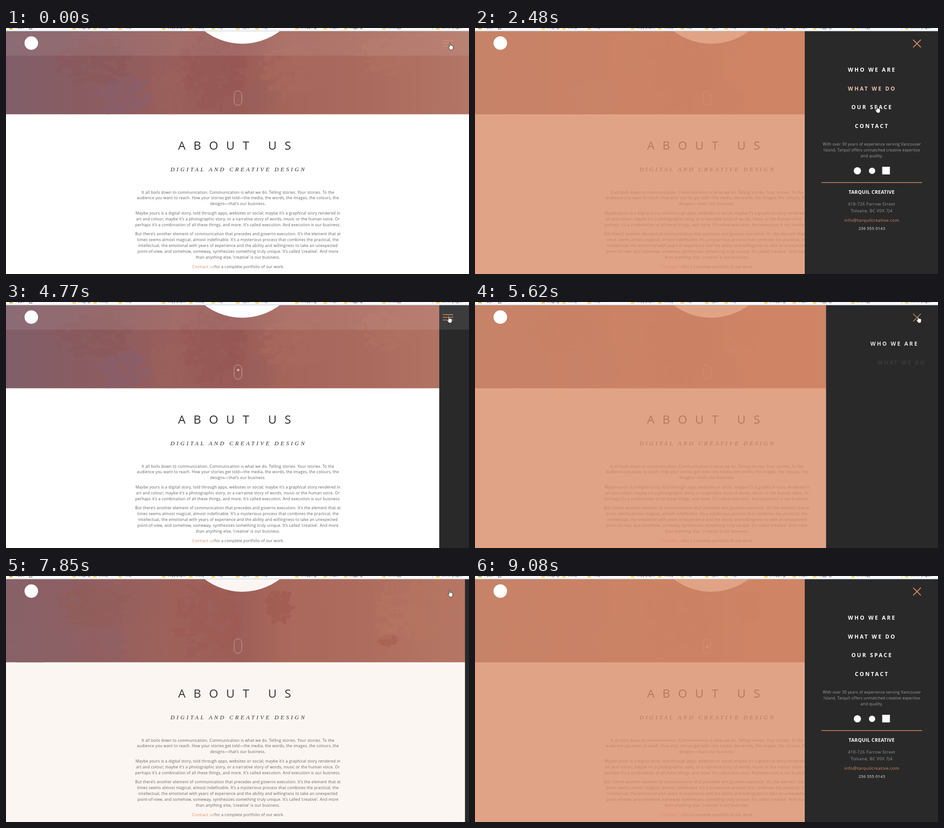
These frames come from a looping animation (1025 px wide and 546 px high, 9960 ms). An HTML page:

```html
<!DOCTYPE html>
<html lang="en">
<head>
<meta charset="utf-8">
<title>Slide-out menu</title>
<style>
html, body { margin: 0; width: 100%; height: 100%; overflow: hidden; background: #fff; }
svg { display: block; width: 1025px; height: 546px; }
text { font-family: "Open Sans", "Noto Sans", sans-serif; }
.mid { text-anchor: middle; }
.copy { font-size: 8.5px; letter-spacing: .27px; fill: #5e5e5e; }
.nav { font-size: 12px; font-weight: 700; letter-spacing: 2.9px; }
.address { font-size: 9.3px; letter-spacing: .45px; fill: #999; }
</style>
</head>
<body>
<svg viewBox="0 0 1025 546">
  <defs>
    <linearGradient id="wash">
      <stop offset="0" stop-color="#805e69"/>
      <stop offset=".2" stop-color="#8c5c60"/>
      <stop offset=".36" stop-color="#995e5a"/>
      <stop offset=".5" stop-color="#995b57"/>
      <stop offset=".6" stop-color="#a5655b"/>
      <stop offset=".78" stop-color="#ab6a5e"/>
      <stop offset="1" stop-color="#b37665"/>
    </linearGradient>
    <clipPath id="heroClip"><rect y="7" width="1025" height="184.5"/></clipPath>
    <clipPath id="barClip"><rect width="1025" height="6"/></clipPath>
  </defs>

  <rect width="1025" height="546" fill="#fff"/>
  <g clip-path="url(#heroClip)">
    <rect y="7" width="1025" height="185" fill="url(#wash)"/>
    <g id="early"></g>
    <g id="late"></g>
    <circle cx="523" cy="-102" r="137" fill="#fff"/>
  </g>
  <rect x="505" y="139.5" width="17" height="32" rx="8.5" fill="none" stroke="#fff" stroke-opacity=".5"/>
  <circle id="dot" cx="514" r="2.5" fill="#fff"/>

  <text x="381" y="269.5" font-size="26" letter-spacing="17.6" fill="#2b2b2b">ABOUT US</text>
  <text x="364" y="318" style="font-family:'Liberation Serif',serif" font-style="italic" font-size="13" letter-spacing="4.13" fill="#2b2b2b">DIGITAL AND CREATIVE DESIGN</text>
  <g id="story"></g>
  <text class="copy" x="412" y="533"><tspan font-size="9.5" fill="#d98d68">Contact us</tspan>for a complete portfolio of our work.</text>

  <rect id="tint" y="7" width="1025" height="539" fill="#d98d68"/>

  <g id="panel">
    <rect x="730" y="7" width="300" height="539" fill="#292929"/>
    <g id="nav"></g>
    <g id="info">
      <g id="blurb"></g>
      <g fill="#fff">
        <circle cx="846.5" cy="317" r="8"/>
        <circle cx="879" cy="317" r="7"/>
        <rect x="901.5" y="308" width="17" height="17"/>
      </g>
      <rect x="767" y="342.3" width="223" height="1.5" fill="#d98d68"/>
      <text class="mid" x="878" y="368.3" font-size="10.6" font-weight="700" letter-spacing=".3" fill="#fff">TARQUIL CREATIVE</text>
      <text class="mid address" x="878" y="393.7">418-726 Farrow Street</text>
      <text class="mid address" x="878" y="408.5">Tolvane, BC V0X 7J4</text>
      <text class="mid" x="878.5" y="430.3" font-size="9.6" letter-spacing=".4" fill="#d98d68">info@tarquilcreative.com</text>
      <text class="mid" x="878.5" y="448.2" font-size="9" font-weight="600" letter-spacing=".25" fill="#b8b8b8">236 555 0143</text>
    </g>
  </g>

  <rect id="header" y="7" width="1025" height="54.5" fill="#fff" opacity=".09"/>
  <circle cx="56" cy="33.5" r="15" fill="#fff"/>
  <g id="icon" stroke="#d98d68" stroke-width="1.8" fill="none">
    <path id="lines" d="M967 28h23M967 34h23M967 40h23"/>
    <path id="cross" d="M970 26l17 17M987 26l-17 17"/>
  </g>

  <rect width="1025" height="6" fill="#f8f9fa"/>
  <rect y="6" width="1025" height="1.2" fill="#c3d2dc"/>
  <g id="marks" clip-path="url(#barClip)"></g>

  <path id="hand" fill="#fff" stroke="#222" stroke-width=".9" stroke-linejoin="round"
    d="M3 1.2c0-1.3 2-1.3 2 0v4.3c.3-.9 1.9-.8 2 .2.4-.7 1.7-.6 1.9.4.5-.6 1.7-.3 1.7.8v3.6c0 2.5-1.3 4-3.6 4-2.2 0-3-.6-4-2.2L.6 9.2c-.7-1.2.6-2 1.5-1.1L3 9.2z"/>
</svg>
<script>
const LOOP = 9960;
const $ = id => document.getElementById(id);
const clamp = v => Math.max(0, Math.min(1, v));
const ease = v => (1 - Math.cos(Math.PI * clamp(v))) / 2;

function add(parent, tag, attrs, text) {
  const el = document.createElementNS("http://www.w3.org/2000/svg", tag);
  for (const k in attrs) el.setAttribute(k, attrs[k]);
  if (text) el.textContent = text;
  return parent.appendChild(el);
}

// Linear interpolation over rows of [time, value, value...]
function track(rows, t) {
  let i = 0;
  while (i < rows.length - 2 && t >= rows[i + 1][0]) i++;
  const [a, b] = [rows[i], rows[i + 1]];
  const k = clamp((t - a[0]) / (b[0] - a[0]));
  return a.slice(1).map((v, n) => v + (b[n + 1] - v) * k);
}

// Static content
let seed = 11;
const rnd = () => (seed = seed * 16807 % 2147483647) / 2147483647;

function blotch(layer, cx, cy, rx, ry, color, opacity) {
  let d = "";
  for (let i = 0; i < 130; i++) {
    const a = rnd() * Math.PI * 2, r = Math.sqrt(rnd()) * (.7 + rnd() * .4);
    const w = 4 + rnd() * rx * .25, h = 2 + rnd() * ry * .25;
    const x = cx + Math.cos(a) * rx * r - w / 2, y = cy + Math.sin(a) * ry * r - h / 2;
    d += `M${x.toFixed(1)} ${y.toFixed(1)}h${w.toFixed(1)}v${h.toFixed(1)}h${-w.toFixed(1)}z`;
  }
  add($(layer), "path", { d, fill: color, opacity });
}
// The backdrop slowly shifts from one set of patches to the other
blotch("early", 200, 75, 85, 50, "#8a5659", .5);
blotch("early", 260, 150, 65, 45, "#87606f", .6);
blotch("early", 360, 140, 45, 55, "#9e625d", .5);
blotch("early", 465, 100, 75, 90, "#965653", .45);
blotch("early", 560, 155, 38, 35, "#985f5d", .45);
blotch("early", 645, 95, 80, 60, "#aa695e", .6);
blotch("early", 840, 60, 60, 45, "#b27363", .4);
blotch("late", 70, 145, 95, 50, "#855f6a", .55);
blotch("late", 195, 65, 75, 50, "#8c5654", .5);
blotch("late", 235, 148, 40, 35, "#875e67", .5);
blotch("late", 315, 140, 60, 50, "#98605d", .5);
blotch("late", 450, 95, 80, 85, "#96544f", .4);
blotch("late", 605, 65, 28, 38, "#99504b", .5);
blotch("late", 845, 143, 20, 13, "#a05549", .5);
blotch("late", 915, 80, 110, 75, "#b37561", .45);

const story = [
  [367.5, "It all boils down to communication. Communication is what we do. Telling stories. Your stories. To the"],
  [380.3, "audience you want to reach. How your stories get told—the media, the words, the images, the colours, the"],
  [393.1, "designs—that’s our business."],
  [414.2, "Maybe yours is a digital story, told through apps, websites or social; maybe it’s a graphical story rendered in"],
  [427, "art and colour; maybe it’s a photographic story, or a narrative story of words, music or the human voice. Or"],
  [439.8, "perhaps it’s a combination of all these things, and more. It’s called execution. And execution is our business."],
  [460.3, "But there’s another element of communication that precedes and governs execution. It’s the element that at"],
  [473.1, "times seems almost magical, almost indefinable. It’s a mysterious process that combines the practical, the"],
  [485.9, "intellectual, the emotional with years of experience and the ability and willingness to take an unexpected"],
  [498.7, "point-of-view, and somehow, someway, synthesizes something truly unique. It’s called ‘creative’. And more"],
  [511.5, "than anything else, ‘creative’ is our business."]
];
for (const [y, s] of story) add($("story"), "text", { class: "copy mid", x: 513.5, y }, s);

["With over 30 years of experience serving Vancouver",
 "Island, Tarquil offers unmatched creative expertise",
 "and quality."].forEach((s, i) =>
  add($("blurb"), "text", { class: "copy mid", x: 878.5, y: 261.2 + i * 12.8, style: "fill:#a2a2a2" }, s));

const nav = ["WHO WE ARE", "WHAT WE DO", "OUR SPACE", "CONTACT"].map((s, i) =>
  add($("nav"), "text", { class: "nav mid", x: 879, y: 97 + i * 41.6 }, s));

const labels = "Staging,Study,Help,Copy paper,Today,Key,Type,Play,Shopping,Maps,Logging,Strategy,Other pages".split(",");
[151, 197, 253, 349, 409, 459, 513, 556, 644, 707, 752, 837, 956].forEach((x, i) => {
  add($("marks"), "rect", { x: x - 4, y: 0, width: 8, height: 3.5, rx: 1, fill: "#f3d46a" });
  add($("marks"), "text", { x: x + 8, y: 1, "font-size": 8, fill: "#444" }, labels[i]);
});
add($("marks"), "rect", { x: 7, y: 0, width: 8, height: 3, fill: "#d9b44a" });
add($("marks"), "text", { x: 22, y: 1, "font-size": 8, fill: "#444" }, "Apps");
add($("marks"), "path", { d: "M51.5 0v2.5h6V0", fill: "none", stroke: "#555" });
add($("marks"), "rect", { x: 944, y: 0, width: 1, height: 4, fill: "#ccc" });

// Screen refresh times as [first, last, count]
const ticks = [0];
for (const [a, b, n] of [
  [550, 670, 2], [1540, 1840, 2], [2000, 2480, 4], [2600, 2860, 3], [3000, 3980, 8],
  [4100, 4770, 6], [4910, 5060, 2], [5180, 5620, 4], [5780, 6200, 4], [6320, 6590, 3],
  [6860, 7580, 6], [7850, 8000, 2], [8140, 8840, 6], [8960, 9080, 2]
]) for (let i = 0; i < n; i++) ticks.push(Math.round(a + (b - a) * i / (n - 1)));

const visits = [[527, 4461], [5288, 6930], [7800, 1e6]];
const hovers = [
  [[3560, 3850]],
  [[2160, 2400], [3200, 3500]],
  [[2470, 3150]],
  []
];
const handPath = [
  [0, 984, 40], [1840, 984, 40], [2000, 958, 72], [2160, 915, 125], [2320, 896, 146],
  [2480, 891, 180], [3000, 893, 186], [3280, 900, 142], [3560, 915, 100], [3840, 938, 75],
  [3980, 941, 72], [4240, 970, 46], [4400, 981, 38], [5620, 982, 38], [7850, 983, 38],
  [8140, 983, 40], [8420, 970, 200], [8840, 950, 528]
];
const dotPath = [
  [0, 159, .06], [550, 159, 0], [4600, 149, 0], [4770, 151, .6], [5620, 159, .1],
  [5780, 160, 0], [8000, 150, 0], [8840, 157, .6], [LOOP, 157, .6]
];
const warm = [217, 141, 104];

function draw(t) {
  const visit = visits.filter(v => t >= v[0]).pop() || [1e6, 1e6];
  const since = Math.max(0, t - visit[0]), closed = Math.max(0, t - visit[1]);
  const swing = (ms, wait = 0) => ease((since - wait) / ms) - ease((closed - wait) / ms);
  const leave = 1 - clamp(closed / 200);

  $("panel").setAttribute("transform", `translate(${(295 * (1 - swing(450))).toFixed(2)})`);
  $("tint").setAttribute("opacity", .8 * swing(205, 8));
  $("header").setAttribute("visibility", since > 0 && !closed ? "hidden" : "visible");

  const shift = ease((t - 4800) / 2400);
  $("early").setAttribute("opacity", 1 - shift);
  $("late").setAttribute("opacity", shift);

  nav.forEach((el, i) => {
    const p = ease((since - 130 - i * 155) / 260);
    let mix = 0;
    for (const [on, off] of hovers[i])
      mix = Math.max(mix, clamp((Math.min(t, off) - on) / 300) - Math.max(0, t - off) / 300);
    el.setAttribute("fill", `rgb(${warm.map(c => Math.round(255 + (c - 255) * mix))})`);
    el.setAttribute("opacity", p * leave);
    el.setAttribute("transform", `translate(${20 * (1 - p)})`);
  });

  const rise = ease((since - 860) / 420);
  $("info").setAttribute("opacity", rise * leave);
  $("info").setAttribute("transform", `translate(0 ${14 * (1 - rise)})`);

  const [x, y] = track(handPath, t);
  $("hand").setAttribute("transform", `translate(${x - 5.5} ${y - 7}) scale(1.08)`);
  $("hand").setAttribute("visibility", t >= 8960 ? "hidden" : "visible");

  const near = Math.hypot(x - 981, y - 37) < 16;
  const turned = clamp((since - 50) / 80) - clamp((closed - 50) / 80);
  const flat = 1 - clamp(since / 50) + clamp((closed - 100) / 80);
  $("icon").setAttribute("opacity", near ? .75 : 1);
  $("cross").setAttribute("opacity", turned);
  $("lines").setAttribute("opacity", flat);

  const [dy, glow] = track(dotPath, t);
  $("dot").setAttribute("cy", dy);
  $("dot").setAttribute("opacity", glow);
}

const start = performance.now();
let shown = -1;
function loop() {
  const now = (performance.now() - start) % LOOP;
  const t = ticks.filter(v => v <= now).pop();
  if (t !== shown) draw(shown = t);
  requestAnimationFrame(loop);
}
loop();
</script>
</body>
</html>
```
